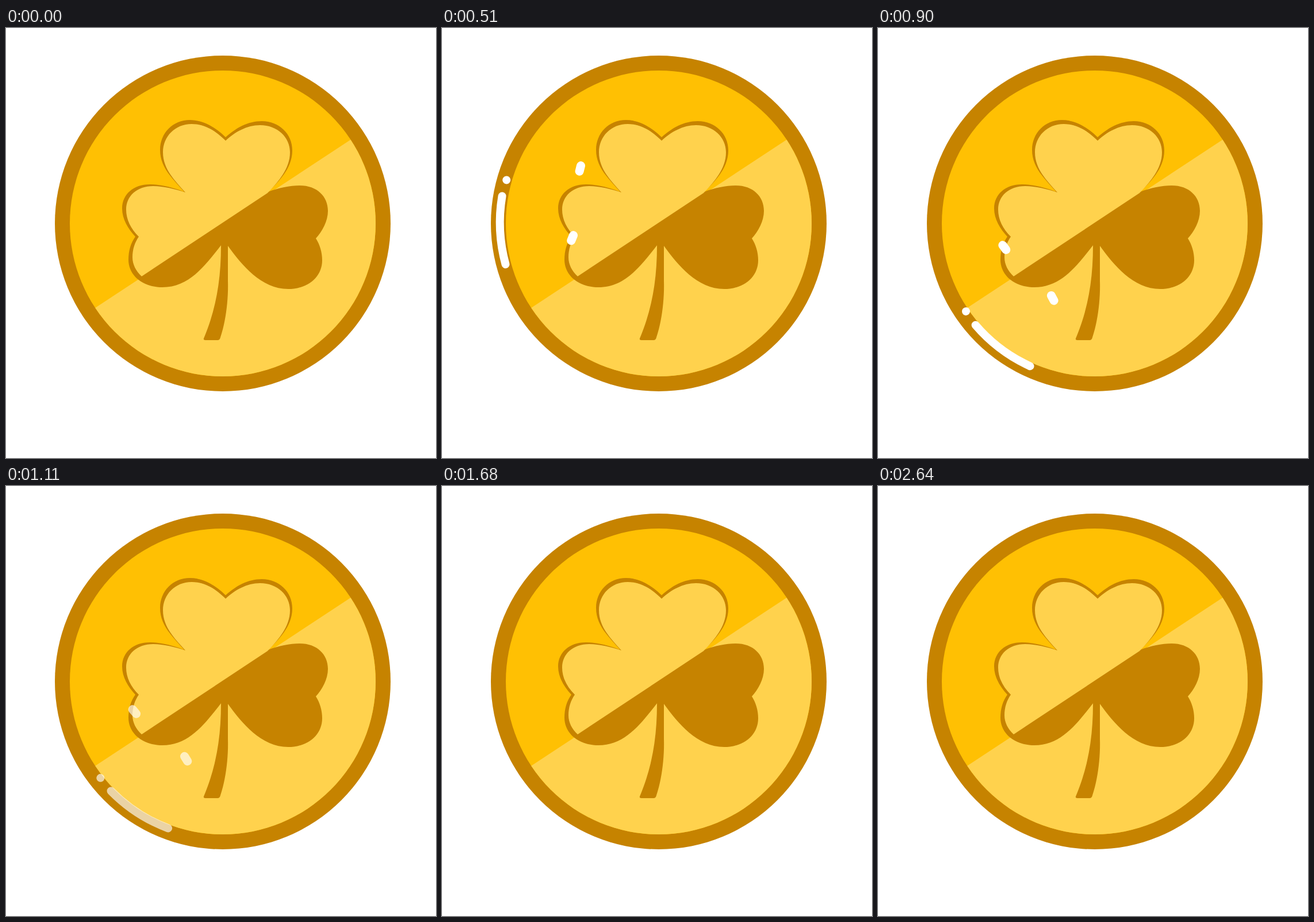
Animation of 748 by 748 pixels, one loop 2.67 s. Source, as an HTML page:

```html
<!DOCTYPE html>
<html lang="en">
<head>
<meta charset="utf-8">
<title>Clover coin</title>
<style>
  html, body { margin: 0; width: 100%; height: 100%; overflow: hidden; background: #fff; }
  svg { display: block; width: 100vw; height: 100vh; }
</style>
</head>
<body>
<svg viewBox="0 0 748 748">
  <defs>
    <clipPath id="face"><circle cx="377" cy="340" r="266"/></clipPath>
  </defs>
  <circle cx="377" cy="340" r="292" fill="#c68300"/>
  <circle cx="377" cy="340" r="266" fill="#ffc003"/>
  <path clip-path="url(#face)" fill="#ffd24d" d="M79 537 L676 144 V640 H79Z"/>
  <path id="clover" fill="#c68300" d="M310 285
    C290 262 268 243 268 212 C268 183 290 160 320 160 C344 160 366 174 382 190
    C400 174 420 162 445 162 C475 162 498 184 498 213 C498 242 478 264 456 285
    C474 278 495 274 511 274 C541 274 560 293 560 318 C560 336 550 354 539 366
    C546 377 550 390 550 404 C550 434 524 454 491 454 C444 454 410 412 386 379
    L386 440 C387 470 383 508 373 538 Q372 543 368 543 L347 543 Q343 543 344 540
    C365 490 374 440 374 378
    C345 415 318 451 272 451 C237 451 213 430 213 403 C213 387 217 374 225 363
    C212 349 202 332 202 314 C202 289 222 272 250 272 C270 272 292 278 310 285Z"/>
  <path id="leaf" fill="#ffd24d" d="M312 286
    C293 265 273 245 273 216 C273 189 294 167 323 167 C347 167 366 180 382 196
    C398 181 419 169 442 169 C472 169 494 190 494 216 C494 243 477 264 455 287
    L236 432 C226 423 220 411 220 399 C220 385 224 373 231 363
    C217 349 209 333 209 316 C209 292 228 275 256 275 C274 275 294 280 312 286Z"/>
  <g id="shine" fill="none" stroke="#fff" stroke-linecap="round" opacity="0">
    <path stroke-width="14" d="M105 282 A276 276 0 0 1 153.5 173.5"/>
    <circle cx="173" cy="152" r="7" fill="#fff" stroke="none"/>
    <path stroke-width="15" d="M293 196 L299.5 188.5 M225.5 297 L233 290.5"/>
  </g>
</svg>
<script>
  const LOOP = 2670, STEP = 30, TURN = -81;
  const shine = document.getElementById('shine');

  // Smooth ease from 0 to 1 between times a and b
  function ease(t, a, b) {
    const x = Math.min(1, Math.max(0, (t - a) / (b - a)));
    return x * x * (3 - 2 * x);
  }

  function draw(now) {
    const t = Math.floor((now % LOOP) / STEP) * STEP;
    const angle = TURN * ease(t, 196, 1008);
    const alpha = ease(t, 0, 300) - ease(t, 990, 1290);
    shine.setAttribute('transform', `rotate(${angle.toFixed(3)} 377 335)`);
    shine.setAttribute('opacity', alpha.toFixed(3));
  }

  let start;
  function tick(now) {
    start ??= now;
    draw(now - start);
    requestAnimationFrame(tick);
  }
  draw(0);
  requestAnimationFrame(tick);
</script>
</body>
</html>
```
